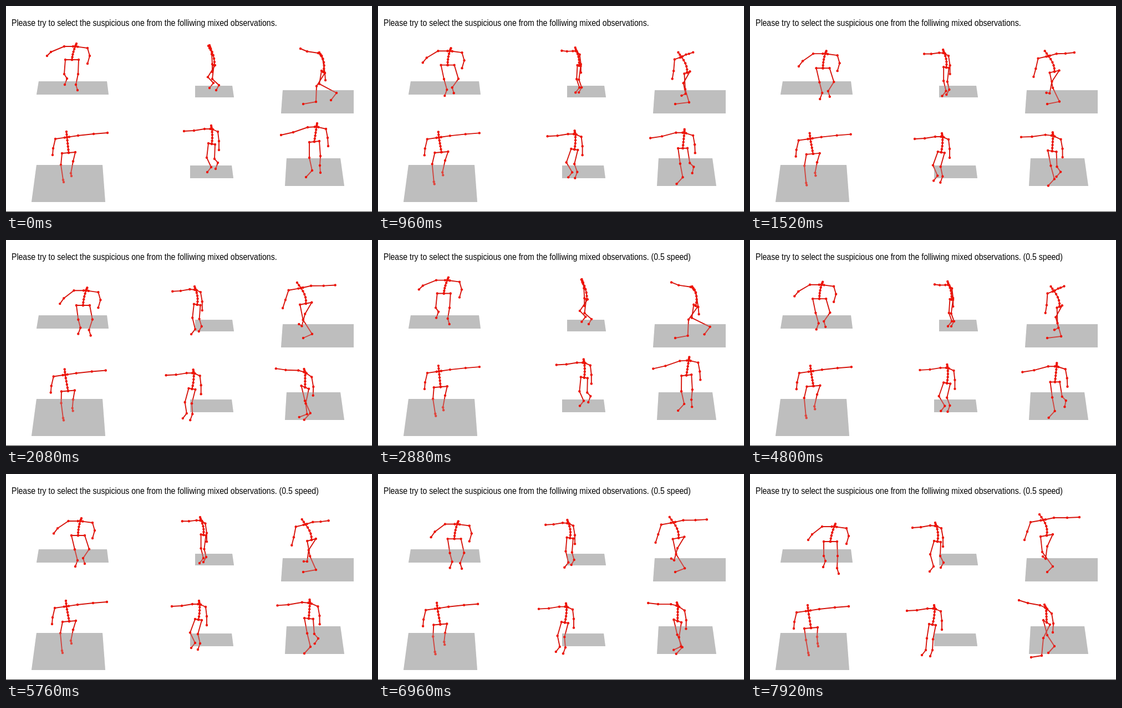
Animation of 660x372 px, one loop 8 s. Source, as an HTML page with a canvas:

```html
<!DOCTYPE html>
<html>
<head>
<meta charset="utf-8">
<style>
html, body { margin: 0; width: 100%; height: 100%; overflow: hidden; background: #fff; }
canvas { display: block; }
</style>
</head>
<body>
<canvas id="stage" width="660" height="372"></canvas>
<script>
const ctx = document.getElementById('stage').getContext('2d');
const LOOP = 8000, STEP = 80, SLOW_FROM = 2880, SLOW_ZERO = 2980;
const CLIP = 2470, MID = 0.563;
const TITLE = 'Please try to select the suspicious one from the folliwing mixed observations.';
const LINE = '#d5140c', DOT = '#ee1408', GREY = '#bebebe';

// How a body turns during the clip
const early = s => Math.sin(Math.max(-0.1, Math.min(s, 1)) * Math.PI / 2);
const late = s => 1 - early(1 - s);

// neck, pelvis, ankle: x,y at start, middle and end, joined by a parabola.
// head, arms (shoulder, elbow, hand): offsets from the neck, first and last.
// hip: offset from the pelvis, mirrored for the second leg.
// knee: sideways offset from the hip; the thigh length gives the height.
// toe: offset from the ankle, or plant: a fixed place on the floor.
const figures = [
  {
    ground: [59, 136, 182, 136, 185, 160, 55, 160], turn: early, bow: -1,
    neck: [125, 73, 134, 85, 152, 95], pelvis: [119, 97, 130, 111, 145, 122],
    head: [[2, -5]], hip: [[-12, 0]],
    arms: [[[-20, 0, -44, 10, -51, 17], [-22, 0, -40, 14, -47, 24]], [[22, 3, 26, 17, 22, 31]]],
    legs: [
      { thigh: 26, knee: [-2, 6, 0], ankle: [110, 131, 129, 156, 136, 157], toe: [[-4, 11]] },
      { thigh: 26, knee: [-1, 8, 1], ankle: [126, 142, 139, 152, 157, 170], toe: [[3, 10]] }]
  },
  {
    ground: [341, 144, 408, 144, 411, 165, 341, 165], turn: early, bow: 2,
    neck: [369, 77, 352, 84, 336, 94], pelvis: [376, 107, 356, 110, 338, 122],
    head: [[-2, -6]], hip: [[1, 0], [-6, -1]],
    arms: [[[0, 2, -2, -1, -4, -5], [-11, -1, -28, 2, -43, 3]], [[2, 10, 3, 28, 3, 42], [9, 4, 12, 21, 12, 37]]],
    legs: [
      { thigh: 25, knee: [-13, 0, -7], ankle: [374, 139, 356, 152, 331, 167], toe: [[-7, 9]] },
      { thigh: 25, knee: [-3, -3, -1], ankle: [384, 143, 361, 150, 349, 160], toe: [[-5, 9]] }]
  },
  {
    ground: [499, 152, 627, 152, 627, 194, 496, 194], turn: early, bow: 3,
    neck: [569, 90, 540, 91, 529, 83], pelvis: [572, 119, 551, 119, 535, 111],
    head: [[-4, -6], [-7, -10]], hip: [[3, 2], [-11, 2]],
    arms: [[[-6, -5, -26, -8, -38, -13], [19, -4, 43, -4, 65, -5]], [[2, 5, 6, 31, 7, 44], [-23, 4, -29, 21, -34, 36]]],
    legs: [
      { thigh: 28, knee: [-15, 5, 3], ankle: [559, 173, 559, 173, 546, 167], plant: [536, 177] },
      { thigh: 24, knee: [-4, -13, -10], ankle: [596, 157, 543, 158, 533, 153], toe: [[-10, 13], [-5, -4]] }]
  },
  {
    ground: [55, 287, 174, 287, 179, 354, 46, 354], turn: early, bow: 0, sunk: true,
    neck: [110, 237, 109, 239, 105, 247], pelvis: [113, 265, 114, 266, 110, 278],
    head: [[-1, -10]], hip: [[-12, 1]],
    arms: [[[-21, 3, -25, 20, -26, 32]], [[20, -3, 48, -6, 73, -8]]],
    legs: [
      { thigh: 21, knee: [-2, -4, 3], ankle: [103, 314, 101, 319, 105, 323], toe: [[1, 4]] },
      { thigh: 17, knee: [-4, -5, -1], ankle: [117, 302, 117, 301, 122, 306], toe: [[1, 5]] }]
  },
  {
    ground: [332, 288, 407, 288, 410, 311, 332, 311], turn: early, bow: 1,
    neck: [371, 222, 349, 235, 333, 243], pelvis: [371, 249, 347, 263, 329, 272],
    head: [[-1, -6]], hip: [[-6, -1]],
    arms: [[[-13, 0, -32, 3, -50, 4]], [[11, 5, 13, 22, 13, 38]]],
    legs: [
      { thigh: 26, knee: [-3, -9, -4], ankle: [370, 291, 341, 305, 317, 318], toe: [[-7, 9]] },
      { thigh: 26, knee: [-1, -7, -5], ankle: [382, 283, 350, 306, 329, 318], toe: [[-4, 11]] }]
  },
  {
    ground: [506, 275, 603, 275, 610, 325, 503, 325], turn: late, bow: 0,
    neck: [560, 218, 548, 233, 534, 242], pelvis: [556, 245, 546, 261, 535, 268],
    head: [[1, -6], [-3, -6]], hip: [[-9, 1], [-6, -4]],
    arms: [[[-16, 1, -42, 10, -64, 15], [-11, -5, -33, -9, -49, -14]], [[17, 4, 20, 20, 21, 35], [10, 10, 13, 28, 12, 44]]],
    legs: [
      { thigh: 28, knee: [0, 5, 7], ankle: [552, 297, 549, 312, 549, 311], toe: [[-11, 12]] },
      { thigh: 27, knee: [2, 2, -12], ankle: [566, 288, 563, 297, 526, 328], toe: [[1, 13], [-19, 3]] }]
  }
];

const add = (a, b, k = 1) => [a[0] + b[0] * k, a[1] + b[1] * k];
const mix = (a, b, u) => [a[0] + (b[0] - a[0]) * u, a[1] + (b[1] - a[1]) * u];

// Parabola through the values at the start, MID and end of the clip
function curve(a, b, c, s) {
  const bend = (b - a - (c - a) * MID) / (MID * (MID - 1));
  return a + (c - a) * s + bend * s * (s - 1);
}
const place = (p, s) => [curve(p[0], p[2], p[4], s), curve(p[1], p[3], p[5], s)];

function blend([from, to = from], u) {
  const out = [];
  for (let i = 0; i < from.length; i += 2)
    out.push(mix([from[i], from[i + 1]], [to[i], to[i + 1]], u));
  return out;
}

function spine(head, neck, pelvis, bow) {
  const bend = add(mix(neck, pelvis, 0.5), [2 * bow, 0]);
  const along = u => mix(mix(neck, bend, u), mix(bend, pelvis, u), u);
  return [head, mix(head, neck, 0.5), neck, ...[0.2, 0.4, 0.6, 0.8, 1].map(along)];
}

function skeleton(f, s) {
  const u = f.turn(s);
  const neck = place(f.neck, s), pelvis = place(f.pelvis, s);
  const [side] = blend(f.hip, u);
  const arms = f.arms.map(arm => {
    const joints = blend(arm, u).map(p => add(neck, p));
    return [neck, mix(neck, joints[0], 0.2), ...joints];
  });
  const legs = f.legs.map((leg, i) => {
    const hip = add(pelvis, side, i ? -1 : 1), ankle = place(leg.ankle, s);
    const dx = curve(...leg.knee, s);
    const knee = add(hip, [dx, Math.sqrt(Math.max(0, leg.thigh ** 2 - dx ** 2))]);
    return [pelvis, hip, knee, ankle, leg.plant || add(ankle, blend(leg.toe, u)[0])];
  });
  return [spine(add(neck, blend(f.head, u)[0]), neck, pelvis, f.bow), ...arms, ...legs];
}

function trace(pts) {
  ctx.beginPath();
  pts.forEach(([x, y]) => ctx.lineTo(x, y));
}

function floor(ground, alpha) {
  trace(blend([ground], 0));
  ctx.globalAlpha = alpha;
  ctx.fillStyle = GREY;
  ctx.fill();
  ctx.globalAlpha = 1;
}

function dots(chains) {
  ctx.fillStyle = DOT;
  for (const [x, y] of chains.flat()) {
    ctx.beginPath();
    ctx.arc(x, y, 2.2, 0, 7);
    ctx.fill();
  }
}

function drawFigure(f, s) {
  const chains = skeleton(f, s);
  floor(f.ground, 1);
  ctx.strokeStyle = LINE;
  ctx.lineWidth = 1.9;
  ctx.lineJoin = 'round';
  chains.forEach(chain => { trace(chain); ctx.stroke(); });
  if (f.sunk) dots(chains);
  floor(f.ground, 0.3); // the floor is slightly see-through
  if (!f.sunk) dots(chains);
}

function drawTitle(text) {
  ctx.save();
  ctx.translate(10, 36);
  ctx.scale(1, 1.19);
  ctx.font = '14.1px "Liberation Sans", Arial, sans-serif';
  ctx.fillStyle = '#000';
  ctx.fillText(text, 0, 0);
  ctx.restore();
}

function draw(now) {
  const time = Math.floor(now % LOOP / STEP) * STEP;
  const slow = time >= SLOW_FROM;
  const s = (slow ? (time - SLOW_ZERO) / 2 : time) / CLIP;
  ctx.fillStyle = '#fff';
  ctx.fillRect(0, 0, 660, 372);
  ctx.fillStyle = '#444';
  ctx.fillRect(0, 371, 660, 1);
  drawTitle(TITLE + (slow ? ' (0.5 speed)' : ''));
  figures.forEach(f => drawFigure(f, s));
}

const start = performance.now();
function tick() {
  draw(performance.now() - start);
  requestAnimationFrame(tick);
}
tick();
</script>
</body>
</html>
```
